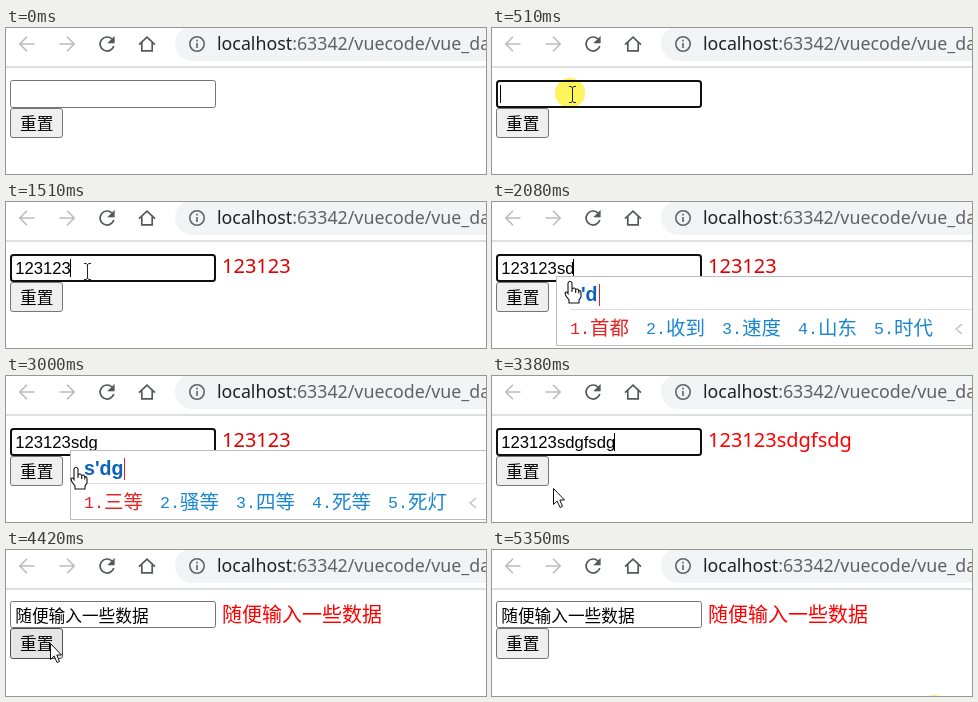
An HTML page with a canvas that plays this animation: 480 by 146 pixels, repeating every 5500 ms.

```html
<!DOCTYPE html>
<html lang="zh">
<head>
<meta charset="utf-8">
<title>Form reset</title>
<style>
html, body { margin: 0; width: 100%; height: 100%; overflow: hidden; background: #fff; }
canvas { display: block; }
</style>
</head>
<body>
<canvas id="stage" width="480" height="146"></canvas>
<script>
const LOOP = 5500;
const ctx = document.getElementById('stage').getContext('2d');
const UI = '"Noto Sans", "Noto Sans CJK SC", sans-serif';
const FIELD = '"Liberation Sans", "Noto Sans CJK SC", sans-serif';
const CJK = '"Noto Sans CJK SC", sans-serif';
const MONO = '"Liberation Mono", monospace';
const PRESET = '随便输入一些数据';
const LIGHT = '300';

// Each track lists [start time, value...]; a value holds until the next start.
const typed = [
  [0, ''], [670, '1'], [750, '12'], [820, '123'], [990, '1231'], [1060, '12312'],
  [1130, '123123'], [1930, '123123s'], [2080, '123123sd'], [2150, '123123sdg'],
  [3080, '123123sdgf'], [3150, '123123sdgfs'], [3230, '123123sdgfsd'],
  [3300, '123123sdgfsdg'], [4340, PRESET]
];
const composing = [
  [0, ''], [1930, 's'], [2080, "s'd"], [2150, "s'dg"], [3080, "s'dg'f"],
  [3150, "s'dg'f's"], [3230, "s'dg'f's'd"], [3300, "s'dg'f's'dg"], [3380, '']
];
const caretOn = [
  [0, false], [370, true], [1680, false], [1850, true], [2610, false],
  [3080, true], [3920, false]
];
const pointer = [
  [0, 'none'], [70, 'arrow', 258, 116], [150, 'arrow', 190, 92], [220, 'beam', 126, 73],
  [290, 'beam', 80, 66], [1510, 'beam', 81, 69], [2000, 'hand', 78, 79],
  [2380, 'hand', 74, 86], [2460, 'hand', 70, 91], [3300, 'hand', 66, 102],
  [3380, 'arrow', 61, 112], [3460, 'arrow', 60, 110], [3540, 'arrow', 59, 109],
  [3690, 'arrow', 56, 106], [3770, 'arrow', 52, 102], [3840, 'arrow', 48, 98],
  [3920, 'arrow', 45, 95], [4000, 'arrow', 44, 93], [4720, 'arrow', 60, 98],
  [4800, 'arrow', 112, 105], [4870, 'arrow', 184, 115], [4950, 'arrow', 264, 126],
  [5020, 'arrow', 347, 138], [5100, 'none']
];
const clicks = [
  [0], [370, 78, 65], [590], [4170, 43, 94], [4420], [5350, 442, 160]
];
const candidates = {
  "s": ['是', '说', '上', '时', '三'],
  "s'd": ['首都', '收到', '速度', '山东', '时代'],
  "s'dg": ['三等', '骚等', '四等', '死等', '死灯']
};

const at = (track, t) => track.findLast(key => key[0] <= t);
const within = (t, a, b) => t >= a && t < b;

function text(str, x, y, size, family, color, weight = '') {
  ctx.font = `${weight} ${size}px ${family}`;
  ctx.fillStyle = color;
  ctx.fillText(str, x, y);
  return ctx.measureText(str).width;
}

function rect(x, y, w, h, color) {
  ctx.fillStyle = color;
  ctx.fillRect(x, y, w, h);
}

function box(x, y, w, h, r, fill, stroke, line = 1) {
  ctx.beginPath();
  ctx.roundRect(x, y, w, h, r);
  ctx.fillStyle = fill;
  ctx.fill();
  ctx.strokeStyle = stroke;
  ctx.lineWidth = line;
  ctx.stroke();
}

function shape(d, x, y, stroke, line, fill) {
  const path = new Path2D(d);
  ctx.save();
  ctx.translate(x, y);
  if (fill) {
    ctx.fillStyle = fill;
    ctx.fill(path);
  }
  ctx.strokeStyle = stroke;
  ctx.lineWidth = line;
  ctx.stroke(path);
  ctx.restore();
}

function drawToolbar() {
  const arrow = 'M7.5 0H-7M0 -7.2L-7.2 0L0 7.2';
  shape(arrow, 21, 16, '#babcbe', 1.6);
  ctx.save();
  ctx.scale(-1, 1);
  shape(arrow, -61, 16, '#babcbe', 1.6);
  ctx.restore();
  shape('M5 -5A7 7 0 1 0 6.8 2', 101, 16, '#54585c', 1.7);
  shape('M7.3 -7.5V-1H.8Z', 101, 16, '#54585c', .6, '#54585c');
  shape('M-8 .6L0 -6.8L8 .6M-5.2 -1.6V6.8H5.2V-1.6', 141, 16, '#54585c', 1.7);

  ctx.beginPath();
  ctx.roundRect(169, -2, 340, 35, 17.5);
  ctx.fillStyle = '#f1f3f4';
  ctx.fill();
  shape('M7.2 0A7.2 7.2 0 1 1 -7.2 0A7.2 7.2 0 1 1 7.2 0M0 -1V4M0 -4.2V-2.4', 191, 16, '#5f6368', 1.6);
  const host = text('localhost', 211, 22, 17.8, UI, '#202124');
  text(':63342/vuecode/vue_data', 211 + host, 22, 17.8, UI, '#5f6368');
  rect(0, 38, 480, 2, '#dcdee0');
}

function drawForm(t) {
  const value = at(typed, t)[1];
  const reset = t >= 4340;
  const focused = within(t, 370, 4170);
  const hover = within(t, 3840, 4720);
  const pressed = within(t, 4170, 4340);

  if (focused) box(5, 53, 204, 26, 2.5, '#fff', '#101010', 2);
  else box(4.5, reset ? 51.5 : 52.5, 205, reset ? 26 : 27, 2, '#fff', '#767676');

  const width = text(value, 9.3, reset ? 71.5 : 72, 16.67, FIELD, '#000', reset ? LIGHT : '');
  if (focused && at(caretOn, t)[1]) rect(Math.floor(9.3 + width - .6), 57, 1, 18, '#000');

  const shown = within(t, 1930, 3380) ? '123123' : value;
  text(shown, 216, reset ? 71.5 : 71, 20, UI, within(t, 670, 3380) ? '#e00000' : '#ff0000',
    reset ? LIGHT : '');

  const y = reset ? 78.5 : 80.5;
  const fill = pressed ? '#f5f5f5' : hover ? '#e5e5e5' : '#efefef';
  box(4.5, y, 52, reset ? 30 : 29, 2.5, fill, hover && !pressed ? '#4f4f4f' : '#767676');
  text('重置', 14, y + 21.5, 16.67, CJK, '#000', LIGHT);
}

function drawPopup(code) {
  box(64.5, 74.5, 430, 69, 0, '#fff', '#bcbcbc');
  const width = text(code, 78, 99, 19.6, FIELD, '#0b62bd', 'bold');
  rect(Math.round(79 + width), 82, 1, 22, '#e02020');
  rect(78, 107, 402, 1, '#dedede');
  let x = 78;
  (candidates[code] || candidates["s'dg"]).forEach((word, i) => {
    const color = i ? '#1a86d0' : '#e62222';
    text(`${i + 1}.`, x, 132, 16.67, MONO, color);
    text(word, x + 20, 132.5, 19.5, CJK, color, LIGHT);
    x += 36 + word.length * 20;
  });
  shape('M3 -5L-3 0L3 5', 467, 127, '#bbb', 1.2);
}

function drawPointer([, kind, x, y]) {
  if (kind === 'arrow') {
    shape('M.5 .5V16.5L4.2 13L7 19.5L9.5 18.4L6.8 12H11.5Z', x, y, '#111', 1, '#fff');
  } else if (kind === 'beam') {
    shape('M-3 -7.5H-1L.5 -6.5L2 -7.5H4M.5 -6.5V7.5M-3 8.5H-1L.5 7.5L2 8.5H4', x, y, '#222', 1);
  } else if (kind === 'hand') {
    shape('M-2 2Q0 -1.5 2 2V8Q4.5 5.8 5.7 8.6Q8 7 8.8 9.8Q11 9 11 12V16L9 19V22H-1V19L-4 15L-5 12Q-4 9.8 -2 12.5ZM2 8V11M5.7 8.6V12M8.8 9.8V12.5',
      x, y, '#111', 1.1, '#fff');
  }
}

function drawClick([, x, y]) {
  if (x === undefined) return;
  ctx.save();
  ctx.globalCompositeOperation = 'multiply';
  ctx.beginPath();
  ctx.arc(x, y, 15, 0, Math.PI * 2);
  ctx.fillStyle = '#fdf35c';
  ctx.fill();
  ctx.restore();
}

function draw(now) {
  const t = now % LOOP;
  rect(0, 0, 480, 146, '#fff');
  drawToolbar();
  drawForm(t);
  const code = at(composing, t)[1];
  if (code) drawPopup(code);
  drawClick(at(clicks, t));
  drawPointer(at(pointer, t));
}

const start = performance.now();
function tick() {
  draw(performance.now() - start);
  requestAnimationFrame(tick);
}
tick();
</script>
</body>
</html>
```
